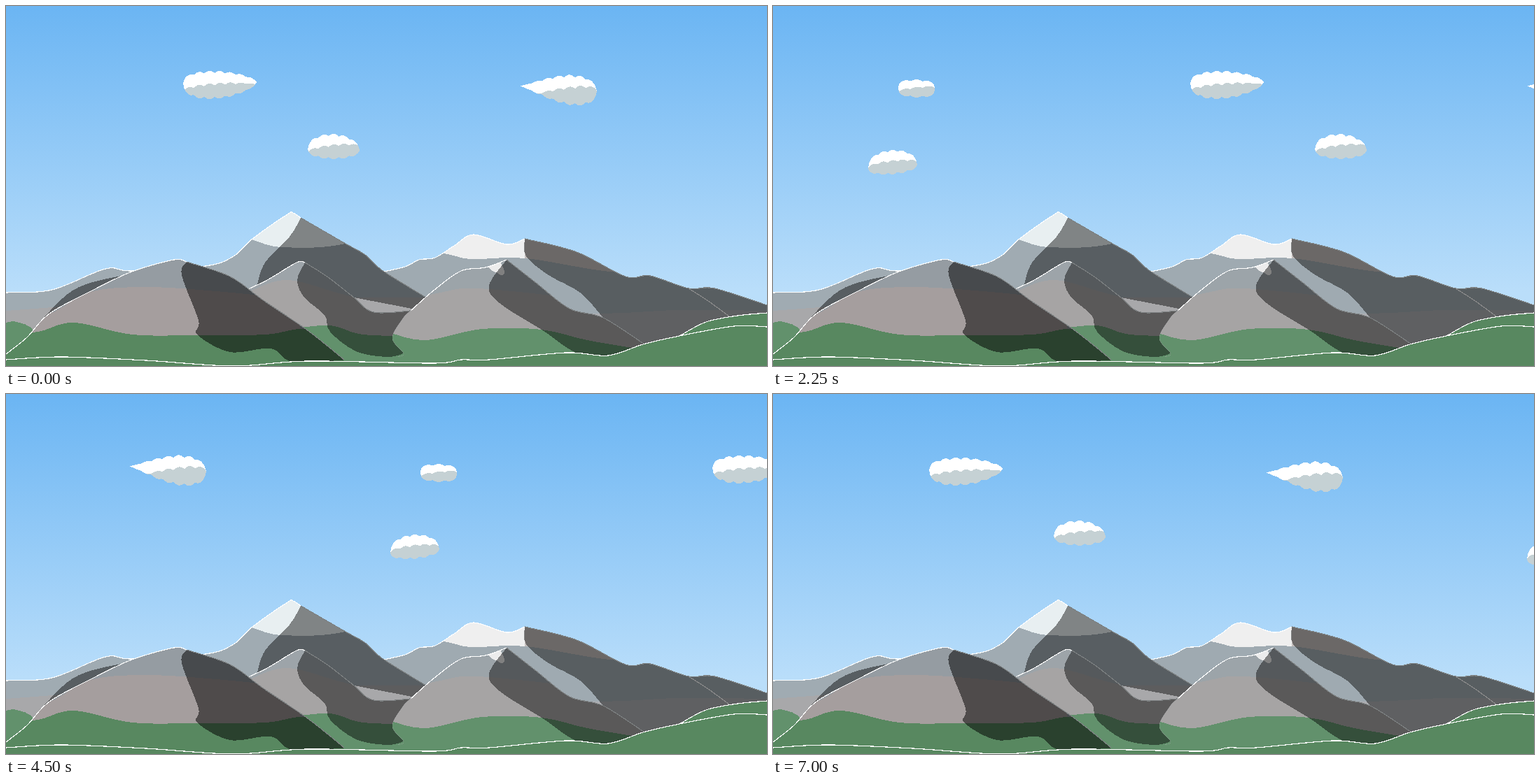
An HTML page that plays this animation: 1087x515 px, repeating every 7.25 s.

```html
<!DOCTYPE html>
<html lang="en">
<head>
<meta charset="utf-8">
<title>Clouds over mountains</title>
<style>
html, body { margin: 0; width: 100%; height: 100%; overflow: hidden; }
svg { display: block; width: 100%; height: 100%; }
</style>
</head>
<body>
<svg id="scene" viewBox="0 0 1087 515" shape-rendering="crispEdges">
  <defs>
    <linearGradient id="sky" gradientUnits="userSpaceOnUse" x1="0" y1="0" x2="0" y2="410">
      <stop offset="0" stop-color="#6bb5f3"/>
      <stop offset="1" stop-color="#badefa"/>
    </linearGradient>
  </defs>
  <rect width="1087" height="515" fill="url(#sky)"/>
</svg>
<script>
const scene = document.getElementById('scene');
const FLOOR = 515;

function add(parent, tag, attributes) {
  const node = document.createElementNS('http://www.w3.org/2000/svg', tag);
  for (const key in attributes) node.setAttribute(key, attributes[key]);
  return parent.appendChild(node);
}

// Smooth curve through the given points (Catmull-Rom as Bézier segments)
function curve(text) {
  const points = text.split(' ').map(pair => pair.split(',').map(Number));
  const at = i => points[Math.max(0, Math.min(points.length - 1, i))];
  const handle = (i, sign) => at(i).map((v, axis) => v + sign * (at(i + 1)[axis] - at(i - 1)[axis]) / 6);
  return points.slice(1).reduce(
    (path, point, i) => `${path} C${handle(i, 1)} ${handle(i + 1, -1)} ${point}`, 'M' + points[0]);
}
// Closed outline: curves joined by straight lines
const region = (...curves) => 'M' + curves.map(curve).join(' ').slice(1).replaceAll('M', 'L') + 'Z';
const downToFloor = top => `${curve(top)} V${FLOOR} H${parseFloat(top)} Z`;

const fill = (parent, d, color, opacity = 1) => add(parent, 'path', { d, fill: color, 'fill-opacity': opacity });
const line = (points, stroke) => add(scene, 'path', { d: curve(points), stroke, fill: 'none', 'stroke-width': 1.2 });

// left and right set how blunt each end is; tilt lowers the right end of the waist
const clouds = [
  { x: 253,  y: 94,  width: 105, height: 38, waist: 16, tilt: -2, left: .4,  right: .65 },
  { x: 734,  y: 100, width: 110, height: 41, waist: 20, tilt: 8,  left: 1.2, right: .5 },
  { x: 431,  y: 184, width: 74,  height: 34, waist: 22, tilt: 1,  left: .45, right: .5 },
  { x: -164, y: 106, width: 52,  height: 24, waist: 12, tilt: 1,  left: .25, right: .25 },
  { x: -207, y: 207, width: 70,  height: 33, waist: 23, tilt: -5, left: .4,  right: .45 }
];

function drawCloud(layer, { x, y, width, height, waist, tilt, left, right }) {
  const peak = left / (left + right);
  const swell = u => u ** left * (1 - u) ** right;
  const puffs = Math.round(width / 15);
  const top = [], bottom = [], shade = [];
  for (let i = 0; i <= 60; i++) {
    const u = i / 60, dome = swell(u) / swell(peak);
    const puff = height * .09 * (Math.abs(Math.sin(Math.PI * puffs * u)) - .6) * dome;
    const middle = waist + tilt * (u - peak);
    const upper = middle - waist * dome - puff;
    const lower = middle + (height - waist) * dome + puff;
    const border = height * (.75 - .25 * u - .18 * dome) - puff;
    top.push([x + width * u, y + upper]);
    bottom.unshift([x + width * u, y + lower]);
    shade.push([x + width * u, y + Math.min(lower, Math.max(upper, border))]);
  }
  add(layer, 'polygon', { points: [...top, ...bottom].join(' '), fill: '#fff' });
  add(layer, 'polygon', { points: [...shade, ...bottom].join(' '), fill: '#c5d1d4' });
}

function cloudLayer() {
  const layer = add(scene, 'g', {});
  for (const cloud of clouds) drawCloud(layer, cloud);
  return layer;
}
const leading = cloudLayer(), following = cloudLayer();

// A hill has a lit and a shaded ridge, colour bands from top to bottom, and shadows.
let hillCount = 0;
function hill({ lit, shaded, closing, base, bands, shadows, depth }) {
  const id = 'hill' + hillCount++;
  fill(add(scene, 'clipPath', { id }), region(lit, shaded, ...closing), '#000');
  const face = add(scene, 'g', { 'clip-path': `url(#${id})` });
  add(face, 'rect', { width: 1087, height: FLOOR, fill: base });
  for (const [color, top] of bands) fill(face, downToFloor(top), color);
  for (const shadow of shadows) fill(face, region(...shadow), '#000', depth);
  line(lit, '#fff');
  line(shaded, '#7d8182');
}

// Rear right mountain
hill({
  lit: '530,382 570,373 590,363 613,360 640,343 668,327 715,341 741,333',
  shaded: '741,333 815,352 885,387 920,386 975,404 1012,404 1087,428',
  closing: ['1087,515 530,515'],
  base: '#efefef',
  bands: [
    ['#c3bdbb', '741,300 1087,300'],
    ['#9faab1', '530,340 625,354 665,362 742,361 868,380 890,360 1087,360'],
    ['#adaeb2', '530,440 840,440 960,435 1087,436']
  ],
  shadows: [['741,333 743,358 775,385 820,410 853,446', '853,515 1087,515', '1087,300 741,300']],
  depth: .45
});
line('975,404 1003,422 1033,444', '#8b8b8b');

// Rear left range with the highest peak
hill({
  lit: '0,410 66,406 142,376 180,379 285,372 325,358 352,333 402,298 410,296 421,303',
  shaded: '421,303 485,340 513,356 537,378 600,417',
  closing: ['580,433 580,515', '0,515 0,410'],
  base: '#e8eff1',
  bands: [
    ['#a0abb2', '0,300 300,320 350,334 395,345 485,340 600,300'],
    ['#a8a8aa', '0,436 345,412 497,417 600,417'],
    ['#62916c', '0,453 15,452 40,465 60,515']
  ],
  shadows: [
    ['421,303 405,330 370,367 358,402', '497,417 580,433', '620,417 620,290', '421,290 421,303'],
    ['168,385 95,407 33,470', '45,475 85,428 168,385']
  ],
  depth: .45
});

// Middle front hill
hill({
  lit: '346,405 375,391 415,367 427,367',
  shaded: '427,367 460,388 497,417 525,438 578,436',
  closing: ['590,515 346,515'],
  base: '#9da4a9',
  bands: [
    ['#a6a4a4', '340,412 400,392 480,412 590,440'],
    ['#62916c', '400,463 462,457 510,470 590,472']
  ],
  shadows: [['427,367 416,392 426,417 455,442 463,466 500,494 545,502 568,497', '590,490 590,360', '427,360 427,367']],
  depth: .46
});

// Right front hill
hill({
  lit: '578,436 612,406 650,379 685,374 715,363',
  shaded: '715,363 757,396 805,433 853,446 912,484',
  closing: ['912,515 560,515', '560,502 568,497 552,475 567,447 578,436'],
  base: '#ececec',
  bands: [
    ['#9ca4a9', '550,420 660,365 697,380 712,382 718,340 912,340'],
    ['#a6a4a4', '550,430 620,410 690,405 912,430'],
    ['#62916c', '550,468 600,478 680,462 765,463 830,478 912,492']
  ],
  shadows: [['715,363 690,400 705,425 765,463 825,500 912,505', '912,350 715,350']],
  depth: .46
});

// Left front hill
hill({
  lit: '0,498 30,474 62,440 125,406 180,380 240,363 258,366',
  shaded: '258,366 320,387 366,420 432,465 483,506',
  closing: ['483,515 0,515'],
  base: '#959ca2',
  bands: [
    ['#a59e9e', '0,445 62,440 120,409 200,402 300,408 420,420'],
    ['#588860', '0,468 46,466 97,453 180,470 270,471 370,470 420,462 483,464']
  ],
  shadows: [['258,366 251,385 275,450 273,470 320,495 378,490 410,509 490,506', '490,350 258,350']],
  depth: .52
});

// Foreground meadow
const rise = '962,472 1000,452 1045,443 1087,439';
const meadow = '0,506 80,502 200,507 325,515 430,508 610,511 650,506 690,506 800,496 860,500 910,484 962,472 1040,458 1087,459';
for (const top of [rise, meadow]) fill(scene, downToFloor(top), '#588860');
for (const top of [rise, meadow]) line(top, '#fff');

// Drift keys: step, x, y. The second layer trails by one lap.
const STEP = 250, STEPS = 29, LAP_X = 1314, LAP_Y = 6;
const drift = [
  [0, 0, 0], [4, 141, 3], [5, 172, 3], [9, 343, 0], [13, 506, -5],
  [18, 756, -5], [24, 1094, -1], [25, 1152, -3], [28, 1284, 4], [STEPS, LAP_X, LAP_Y]
];

function draw(now) {
  const step = Math.floor(now / STEP) % STEPS;
  const next = drift.findIndex(key => key[0] > step);
  const from = drift[next - 1], to = drift[next];
  const part = (step - from[0]) / (to[0] - from[0]);
  const [x, y] = [1, 2].map(i => Math.round(from[i] + (to[i] - from[i]) * part));
  leading.setAttribute('transform', `translate(${x} ${y})`);
  following.setAttribute('transform', `translate(${x - LAP_X} ${y - LAP_Y})`);
}

let start;
function tick(now) {
  start ??= now;
  draw(now - start);
  requestAnimationFrame(tick);
}
draw(0);
requestAnimationFrame(tick);
</script>
</body>
</html>
```
